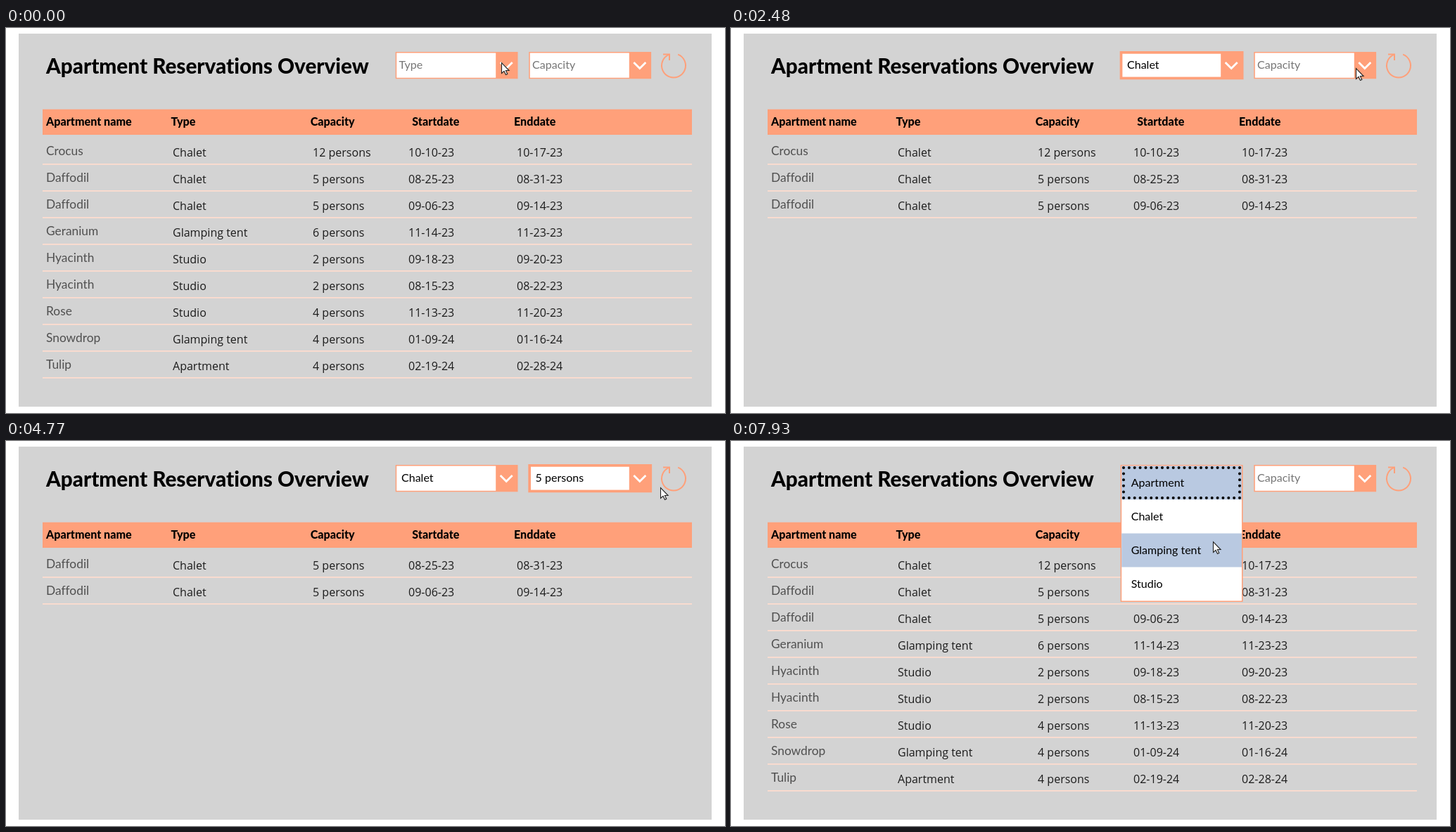
An HTML page with a canvas that plays this animation: 1022x548 px, repeating every 8 s.

```html
<!DOCTYPE html>
<html lang="en">
<head>
<meta charset="utf-8">
<title>Apartment Reservations Overview</title>
<style>
  html, body { margin: 0; width: 100%; height: 100%; overflow: hidden; background: #fff; }
  canvas { display: block; }
</style>
</head>
<body>
<canvas id="stage" width="1022" height="548"></canvas>
<script>
const ctx = document.getElementById('stage').getContext('2d');
ctx.letterSpacing = '0.01px'; // any spacing turns ligatures off

const LOOP = 8000;
const SALMON = '#ffa07a', PALE_SALMON = '#ffb899', PANEL = '#d3d3d3', HIGHLIGHT = '#b9c9e1';
const LATO = 'Lato, sans-serif', OPEN_SANS = '"Open Sans", sans-serif';
const TYPE_X = 553.7, CAPACITY_X = 743.3, BOX_WIDTH = 173.8, BORDER = 1.5;

const headers = [['Apartment name', 57], ['Type', 234.5], ['Capacity', 432.7], ['Startdate', 577.3], ['Enddate', 722]];
const cellX = [57, 237, 436, 572, 726];
const rows = [
  ['Crocus', 'Chalet', '12 persons', '10-10-23', '10-17-23'],
  ['Daffodil', 'Chalet', '5 persons', '08-25-23', '08-31-23'],
  ['Daffodil', 'Chalet', '5 persons', '09-06-23', '09-14-23'],
  ['Geranium', 'Glamping tent', '6 persons', '11-14-23', '11-23-23'],
  ['Hyacinth', 'Studio', '2 persons', '09-18-23', '09-20-23'],
  ['Hyacinth', 'Studio', '2 persons', '08-15-23', '08-22-23'],
  ['Rose', 'Studio', '4 persons', '11-13-23', '11-20-23'],
  ['Snowdrop', 'Glamping tent', '4 persons', '01-09-24', '01-16-24'],
  ['Tulip', 'Apartment', '4 persons', '02-19-24', '02-28-24']
];
const typeItems = ['Apartment', 'Chalet', 'Glamping tent', 'Studio'];
const capacityItems = [2, 4, 5, 6, 8, 12].map(n => n + ' persons');

// Pointer moves: first step, last step, step count, destination, ease-out power
const moves = [
  [490, 900, 6, 668, 127, 2.4],
  [1710, 2480, 12, 888, 57, 1.5],
  [3150, 3280, 3, 847, 134, 1.5],
  [4230, 4980, 10, 944, 54, 1.6],
  [5590, 5590, 1, 850, 62, 1],
  [5660, 6040, 7, 738, 70, 1.8],
  [6310, 6710, 7, 712, 57, 1.5],
  [7520, 7660, 3, 690, 128, 1.5],
  [7860, 7930, 2, 685, 143, 1]
];

const arrowShape = new Path2D('M0 0V15L3.5 11.9L6 17L8.3 16L5.9 11H10.6Z');
const handShape = new Path2D('M-1.5 1Q0 -1 1.5 1V7Q3.2 5.8 4.3 7.5Q6 6.6 6.9 8.3Q9 7.7 9 10V14L7 18V19.5H-1V18L-5 12.5Q-5.8 10 -3.6 10.5L-1.5 12.5Z');

const between = (t, start, end) => t >= start && t < end;

function pointerAt(t) {
  let x = 704, y = 49;
  for (const [start, end, steps, toX, toY, power] of moves) {
    if (t < start) break;
    const interval = (end - start) / (steps - 1) || 1;
    const step = Math.min(steps, Math.floor((t - start) / interval + 0.2) + 1);
    const f = 1 - (1 - step / steps) ** power;
    x += (toX - x) * f;
    y += (toY - y) * f;
  }
  return { x: Math.round(x), y: Math.round(y) };
}

function rect(x, y, w, h, color) {
  ctx.fillStyle = color;
  ctx.fillRect(x, y, w, h);
}

function text(string, x, y, font, color = '#000') {
  ctx.font = font;
  ctx.fillStyle = color;
  ctx.fillText(string, x, y);
}

function polyline(points, color, width) {
  ctx.beginPath();
  for (const [x, y] of points) ctx.lineTo(x, y);
  ctx.strokeStyle = color;
  ctx.lineWidth = width;
  ctx.stroke();
}

function drawTable(type, capacity) {
  rect(52, 115.7, 923, 36.3, SALMON);
  for (const [label, x] of headers) text(label, x, 139, `800 16.1px ${LATO}`);
  rows.filter(r => (!type || r[1] === type) && (!capacity || r[2] === capacity)).forEach((row, i) => {
    const top = 38 * i;
    row.forEach((cell, col) => col
      ? text(cell, cellX[col], 183 + top, `16px ${OPEN_SANS}`, '#1c1c1c')
      : text(cell, cellX[col], 181 + top, `17.33px ${LATO}`, '#505050'));
    rect(52, 193 + top, 923, 1.8, '#fddccf');
  });
}

function drawDropdown(x, placeholder, value, focused) {
  const grow = focused ? 1 : 0, border = focused ? 3.7 : BORDER;
  const left = x - grow, top = 34 - grow, height = 38.3 + 2 * grow;
  rect(left, top, BOX_WIDTH + 2 * grow, height, SALMON);
  rect(left + border, top + border, x + 142.5 - left - border, height - 2 * border, '#fff');
  polyline([[x + 149, 49], [x + 157.5, 57.5], [x + 166, 49]], '#fff', 2.8);
  if (value) text(value, x + 8.3 + grow, 58, `16px ${LATO}`);
  else text(placeholder, x + 4.8, 58, `16px ${LATO}`, '#767676');
}

function dottedEdge(x1, y1, x2, y2) {
  const length = Math.hypot(x2 - x1, y2 - y1);
  ctx.setLineDash([0, length / Math.round(length / 8)]);
  polyline([[x1, y1], [x2, y2]], '#000', 4);
}

function drawMenu(x, items, pointer) {
  const height = items.length * 48 + 2 * BORDER;
  const left = x + BORDER, top = 34 + BORDER, width = BOX_WIDTH - 2 * BORDER;
  const hovered = Math.floor((pointer.y - 36) / 48);
  rect(x, 34, BOX_WIDTH, height, SALMON);
  rect(left, top, width, height - 2 * BORDER, '#fff');
  items.forEach((item, i) => {
    if (i === 0 || i === hovered) rect(left, top + 48 * i, width, 48, HIGHLIGHT);
    text(item, x + 15, 65 + 48 * i, `16px ${LATO}`);
  });
  const l = x + 4.3, r = x + 169.3, t = 38, b = 81;
  ctx.save();
  ctx.lineCap = 'round';
  dottedEdge(l, t, r, t);
  dottedEdge(r, t, r, b);
  dottedEdge(r, b, l, b);
  dottedEdge(l, b, l, t);
  ctx.restore();
}

function drawReload(color) {
  ctx.beginPath();
  ctx.arc(949, 53.5, 17, -1.2, 4.35);
  ctx.strokeStyle = color;
  ctx.lineWidth = 2;
  ctx.stroke();
  polyline([[934, 37.5], [943, 37.5], [943, 46]], color, 2);
}

function drawPointer({ x, y }, hand) {
  const shape = hand ? handShape : arrowShape;
  ctx.save();
  ctx.translate(x + 0.5, y + 0.5);
  ctx.fillStyle = '#fff';
  ctx.fill(shape);
  ctx.strokeStyle = '#222';
  ctx.lineWidth = 1.1;
  ctx.stroke(shape);
  if (hand) {
    for (const knuckle of [1.5, 4.3, 6.9]) polyline([[knuckle, 7.5], [knuckle, 11]], '#222', 0.8);
  }
  ctx.restore();
}

function draw(t) {
  const pointer = pointerAt(t);
  const overReload = (pointer.x > 930 && pointer.y < 72) || between(t, 5590, 5646);
  const typeFocused = between(t, 80, 2550) || t >= 7060;
  const capacityFocused = between(t, 2550, 5050);

  rect(0, 0, 1022, 548, '#fff');
  rect(18, 8, 985, 531, PANEL);
  text('Apartment Reservations Overview', 57, 65, `800 29.67px ${LATO}`);
  drawTable(between(t, 1570, 5720) && 'Chalet', between(t, 3960, 5380) && '5 persons');

  if (between(t, 140, 1170) || t >= 7120) drawMenu(TYPE_X, typeItems, pointer);
  else drawDropdown(TYPE_X, 'Type', between(t, 1170, 5120) && 'Chalet', typeFocused);

  if (between(t, 2610, 3610)) drawMenu(CAPACITY_X, capacityItems, pointer);
  else drawDropdown(CAPACITY_X, 'Capacity', between(t, 3610, 5120) && '5 persons', capacityFocused);

  drawReload(overReload ? PALE_SALMON : SALMON);
  drawPointer(pointer, overReload);
}

const startTime = performance.now();
function tick() {
  draw((performance.now() - startTime) % LOOP);
  requestAnimationFrame(tick);
}
tick();
</script>
</body>
</html>
```
